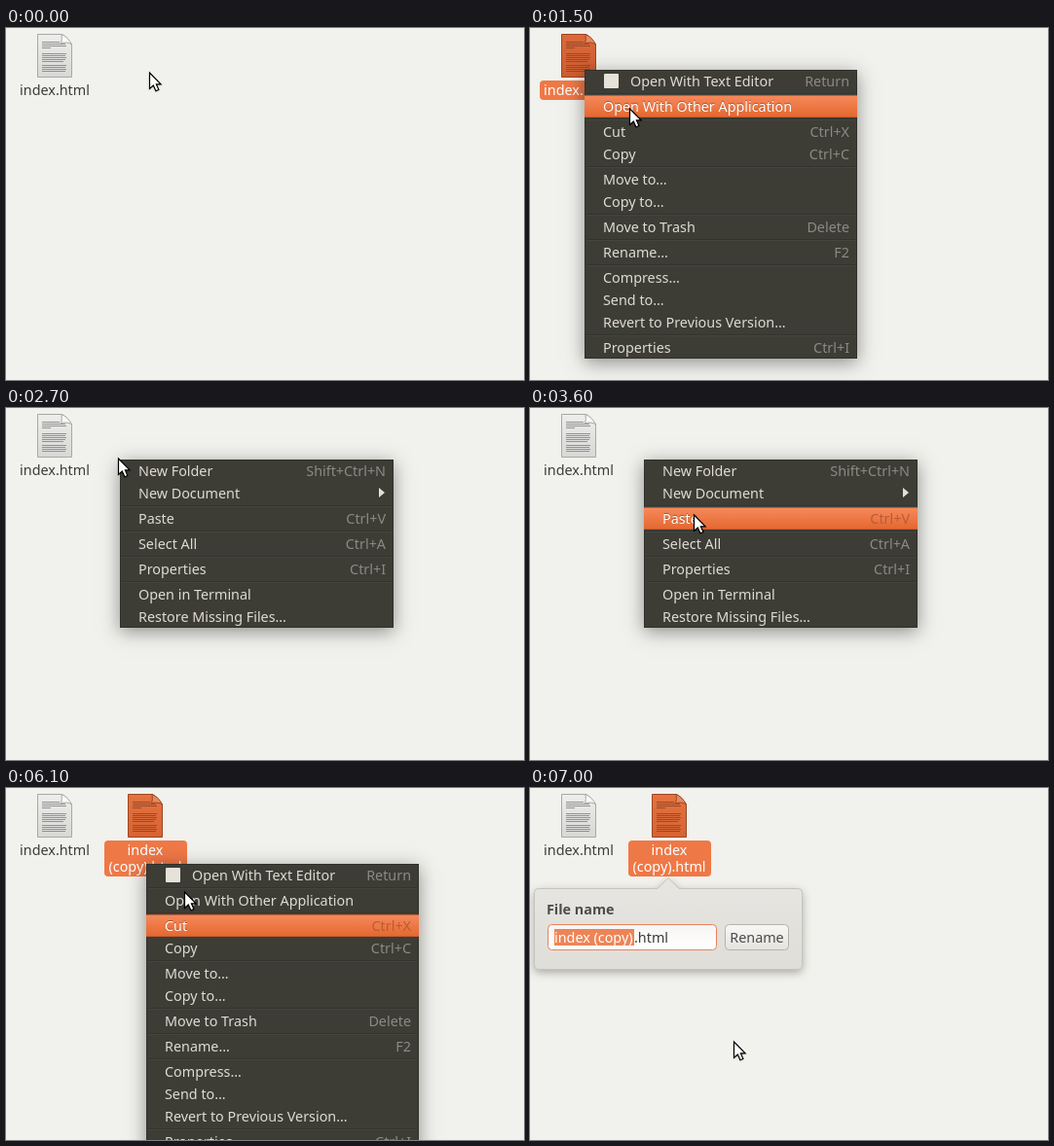
Write an HTML page with a canvas that moves like this. It is 532 px wide and 362 px high and loops after 8000 ms.

```html
<!DOCTYPE html>
<html lang="en">
<head>
<meta charset="utf-8">
<title>Duplicate and rename a file</title>
<style>
html, body { margin: 0; width: 100%; height: 100%; overflow: hidden; background: #f1f1ed; }
canvas { display: block; }
</style>
</head>
<body>
<canvas id="stage" width="532" height="362"></canvas>
<script>
const W = 532, H = 362, LOOP = 8000;
const canvas = document.getElementById('stage');
const ctx = canvas.getContext('2d');
const ratio = window.devicePixelRatio || 1;
canvas.width = W * ratio;
canvas.height = H * ratio;
canvas.style.width = W + 'px';
canvas.style.height = H + 'px';

const FONT = '14.35px "Noto Sans", "Open Sans", sans-serif';
const ROW = 23, GAP = 3;

// Menu entries: [label, shortcut]; null is a separator.
const fileMenu = [
  ['Open With Text Editor', 'Return'], null,
  ['Open With Other Application'], null,
  ['Cut', 'Ctrl+X'], ['Copy', 'Ctrl+C'], null,
  ['Move to…'], ['Copy to…'], null,
  ['Move to Trash', 'Delete'], null,
  ['Rename…', 'F2'], null,
  ['Compress…'], ['Send to…'], ['Revert to Previous Version…'], null,
  ['Properties', 'Ctrl+I']
];
const folderMenu = [
  ['New Folder', 'Shift+Ctrl+N'], ['New Document', '▸'], null,
  ['Paste', 'Ctrl+V'], null,
  ['Select All', 'Ctrl+A'], null,
  ['Properties', 'Ctrl+I'], null,
  ['Open in Terminal'], ['Restore Missing Files…']
];

// Opening and closing times with position and width.
const menus = [
  { from: 800, to: 2100, x: 56, y: 43, w: 280, items: fileMenu },
  { from: 2700, to: 3900, x: 117, y: 53, w: 281, items: folderMenu },
  { from: 5600, to: 6800, x: 144, y: 78, w: 280, items: fileMenu }
];

// Pointer: [time, x, y, highlighted row].
const pointer = [
  [0, 147, 45, -1], [400, 97, 41, -1], [600, 62, 42, -1], [700, 54, 41, -1],
  [1300, 64, 50, 0], [1400, 86, 67, 0], [1500, 102, 82, 1],
  [1600, 107, 93, 2], [1700, 110, 101, 3], [1900, 122, 125, 3],
  [2400, 121, 108, -1], [2500, 118, 74, -1], [2600, 115, 51, -1],
  [3100, 118, 54, 0], [3200, 127, 63, 0], [3300, 141, 77, 1],
  [3400, 153, 91, 1], [3500, 163, 103, 2], [3600, 168, 109, 2],
  [5400, 155, 95, -1], [5500, 142, 76, -1],
  [5900, 150, 81, 0], [6000, 166, 92, 1], [6100, 183, 106, 2],
  [6200, 192, 135, 3], [6300, 199, 170, 5], [6400, 205, 212, 6],
  [6500, 208, 245, 7], [6800, 209, 260, -1]
];

function text(str, x, y, color, align = 'left', font = FONT) {
  ctx.font = font;
  ctx.textAlign = align;
  ctx.fillStyle = color;
  ctx.fillText(str, x, y);
}

function gradient(y, h, top, bottom) {
  const g = ctx.createLinearGradient(0, y, 0, y + h);
  g.addColorStop(0, top);
  g.addColorStop(1, bottom);
  return g;
}

function box(x, y, w, h, r, fill, stroke) {
  ctx.beginPath();
  ctx.roundRect(x, y, w, h, r);
  ctx.fillStyle = fill;
  ctx.fill();
  if (stroke) {
    ctx.strokeStyle = stroke;
    ctx.lineWidth = 1;
    ctx.stroke();
  }
}

function shadow(alpha, blur, dy) {
  ctx.shadowColor = `rgba(0,0,0,${alpha})`;
  ctx.shadowBlur = blur * ratio;
  ctx.shadowOffsetY = dy * ratio;
}

function page(x, y, selected, lit) {
  const [top, bottom, edge, ink, fold] = selected
    ? [lit ? '#e5733f' : '#dc6a3a', lit ? '#d66333' : '#cd5c30', '#9b4723', '#9a4a28', '#e88a60']
    : ['#eeeeec', '#d7d7d5', '#a8a8a6', '#929290', '#fafaf9'];
  ctx.save();
  ctx.translate(x, y);
  ctx.beginPath();
  ctx.moveTo(.5, .5);
  ctx.lineTo(25, .5);
  ctx.quadraticCurveTo(30, 2, 35.5, 11);
  ctx.lineTo(35.5, 44.5);
  ctx.lineTo(.5, 44.5);
  ctx.closePath();
  ctx.fillStyle = gradient(0, 45, top, bottom);
  ctx.fill();
  ctx.strokeStyle = edge;
  ctx.lineWidth = 1;
  ctx.stroke();
  ctx.beginPath();
  ctx.moveTo(25, .5);
  ctx.quadraticCurveTo(26, 6, 24.5, 9.5);
  ctx.quadraticCurveTo(32, 8, 35.5, 11);
  ctx.quadraticCurveTo(32, 3.5, 25, .5);
  ctx.fillStyle = fold;
  ctx.fill();
  ctx.stroke();
  ctx.fillStyle = ink;
  // Three paragraphs: [top, lines, width of the last line].
  for (const [py, n, last] of [[8, 4, 9], [20, 5, 22], [32, 4, 24]]) {
    for (let i = 0; i < n; i++) {
      const w = i === n - 1 ? last : (py === 8 && i === 0 ? 18 : 25 - i % 2);
      ctx.fillRect(5, py + i * 2, w, 1);
    }
  }
  ctx.restore();
}

function file(x, lines, selected, lit, dark) {
  page(x, 6, selected, lit);
  const cx = x + 18;
  if (selected) {
    const w = lines.length > 1 ? 85 : 80;
    const left = lines.length > 1 ? x - 24 : x - 22;
    box(left, 54, w, 3 + 17 * lines.length, 4, dark ? '#ef7847' : '#ee8558');
  }
  lines.forEach((s, i) => text(s, cx, 69 + 17 * i, selected ? '#fff' : '#3c3c3c', 'center'));
}

function menu({ x, y, w, items }, active) {
  const h = items.reduce((sum, it) => sum + (it ? ROW : GAP), 0);
  ctx.save();
  shadow(.42, 18, 4);
  ctx.fillStyle = '#3d3d36';
  ctx.fillRect(x, y, w, h);
  ctx.restore();
  ctx.strokeStyle = '#32322c';
  ctx.lineWidth = 1;
  ctx.strokeRect(x + .5, y + .5, w - 1, h - 1);

  let top = y, row = 0;
  for (const item of items) {
    if (!item) {
      ctx.fillStyle = '#34342e';
      ctx.fillRect(x + 2, top + 1, w - 4, 1);
      ctx.fillStyle = '#45453e';
      ctx.fillRect(x + 2, top + 2, w - 4, 1);
      top += GAP;
      continue;
    }
    const [label, keys] = item;
    const on = row === active;
    const base = top + 17;
    const withIcon = items === fileMenu && row === 0;
    const tx = x + (withIcon ? 47 : 19);
    if (on) {
      ctx.fillStyle = gradient(top, ROW, '#f68a5c', '#e4672f');
      ctx.fillRect(x, top, w, ROW);
      ctx.fillStyle = '#c95c30';
      ctx.fillRect(x, top, w, 1);
      ctx.fillRect(x, top + ROW - 1, w, 1);
      text(label, tx, base - 1, 'rgba(110,45,15,.55)');
    }
    if (withIcon) box(x + 20, top + 4, 15, 15, 1, '#e6e2da');
    text(label, tx, base, on ? '#fff' : '#dfdbd2');
    if (keys === '▸') {
      ctx.beginPath();
      ctx.moveTo(x + w - 15, top + 6);
      ctx.lineTo(x + w - 9, top + 11);
      ctx.lineTo(x + w - 15, top + 16);
      ctx.fillStyle = '#e4e0d8';
      ctx.fill();
    } else if (keys) {
      text(keys, x + w - 8, base, on ? '#b95c36' : '#8b8a83', 'right');
    }
    top += ROW;
    row++;
  }
}

function popoverPath() {
  ctx.beginPath();
  ctx.moveTo(8.5, 103.5);
  ctx.lineTo(131, 103.5);
  ctx.lineTo(142, 92.5);
  ctx.lineTo(153, 103.5);
  ctx.lineTo(275.5, 103.5);
  ctx.arcTo(279.5, 103.5, 279.5, 108, 4);
  ctx.lineTo(279.5, 182);
  ctx.arcTo(279.5, 186.5, 275, 186.5, 4);
  ctx.lineTo(9, 186.5);
  ctx.arcTo(4.5, 186.5, 4.5, 182, 4);
  ctx.lineTo(4.5, 108);
  ctx.arcTo(4.5, 103.5, 9, 103.5, 4);
  ctx.closePath();
}

function popover(alpha) {
  ctx.save();
  ctx.globalAlpha = alpha;
  popoverPath();
  ctx.save();
  shadow(.32, 10, 3);
  ctx.fillStyle = gradient(92, 95, '#e7e6e2', '#dfddd8');
  ctx.fill();
  ctx.restore();
  ctx.strokeStyle = '#c6c4be';
  ctx.lineWidth = 1;
  ctx.stroke();

  text('File name', 17, 130, '#4c4c4c', 'left', 'bold ' + FONT);
  box(18.5, 140.5, 173, 26, 4, gradient(140, 26, '#f6f5f3', '#fff'), '#e6835a');
  ctx.fillStyle = '#ee8456';
  ctx.fillRect(25, 145, 82, 17);
  text('index (copy)', 25, 159, '#fff');
  text('.html', 107, 159, '#3c3c3c');
  box(200.5, 140.5, 65, 26, 4, gradient(140, 26, '#f9f8f7', '#e5e3de'), '#b5b3ad');
  text('Rename', 233, 159, '#4c4c4c', 'center');
  ctx.restore();
}

function arrow(x, y) {
  ctx.save();
  ctx.translate(x + .5, y + 1);
  ctx.beginPath();
  ctx.moveTo(0, 0);
  ctx.lineTo(0, 16.5);
  ctx.lineTo(3.8, 13);
  ctx.lineTo(6.4, 18.8);
  ctx.lineTo(9.4, 17.5);
  ctx.lineTo(6.9, 11.9);
  ctx.lineTo(11.6, 11.9);
  ctx.closePath();
  ctx.save();
  shadow(.3, 2, 1);
  ctx.fillStyle = '#fff';
  ctx.fill();
  ctx.restore();
  ctx.strokeStyle = '#000';
  ctx.lineWidth = 1.2;
  ctx.stroke();
  ctx.restore();
}

function draw(t) {
  ctx.setTransform(ratio, 0, 0, ratio, 0, 0);
  ctx.fillStyle = '#f1f1ed';
  ctx.fillRect(0, 0, W, H);

  const [, px, py, row] = pointer.findLast(p => p[0] <= t);
  file(32, ['index.html'], t >= 700 && t < 2600, false, t < 2100);
  if (t >= 4200) file(125, ['index', '(copy).html'], true, t >= 5500, t >= 5500);

  const open = menus.find(m => t >= m.from && t < m.to);
  if (open) menu(open, row);
  if (t >= 6900) popover(t < 7000 ? .6 : 1);
  arrow(px, py);
}

function tick() {
  draw(performance.now() % LOOP);
  requestAnimationFrame(tick);
}
tick();
</script>
</body>
</html>
```
